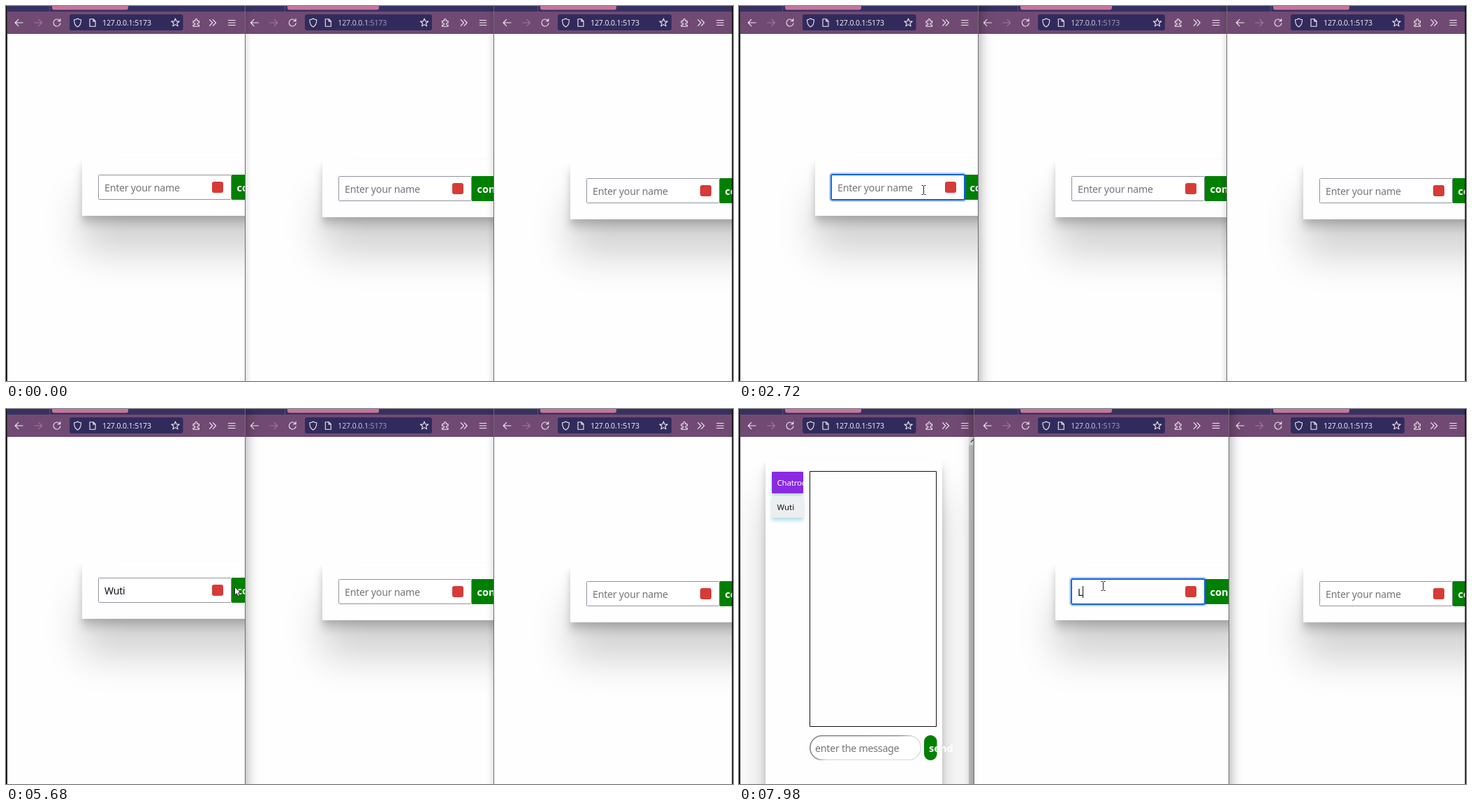
Animation of 1041x538 px, one loop 8 s. Source, as an HTML page with a canvas:

```html
<!DOCTYPE html>
<html lang="en">
<head>
<meta charset="utf-8">
<title>Chat in three windows</title>
<style>
html, body { margin: 0; width: 100%; height: 100%; overflow: hidden; background: #fefefe; }
canvas { display: block; }
</style>
</head>
<body>
<canvas id="stage" width="1041" height="538"></canvas>
<script>
const ctx = document.getElementById('stage').getContext('2d');
const W = 1041, H = 538, LOOP = 8000;
const SANS = '"Noto Sans", "Open Sans", sans-serif';
const PAGE = '#fefefe', GREEN = '#008000';
const USER = 'Wuti';

// Moments of the story, in ms
const ACTIVATE_LEFT = 2110, FOCUS_LEFT = 2180, BLUR_LEFT = 4870;
const JOIN = 5810, ACTIVATE_MID = 7180, FOCUS_MID = 7320;
const KEYS_LEFT = [2990, 3260, 3460, 3590], KEY_MID = 7980;

const WINDOWS = {
  left: { x: 1, right: 343, nav: 0, tools: 0, end: 0, bar: [91, 162.5], tab: [66, 109] },
  mid: { x: 336, right: 702, nav: 337.3, tools: 356.5, end: 359.7, bar: [428, 182], tab: [403, 131] },
  right: { x: 698, right: 1041, nav: 699, tools: 699, end: 699.3, bar: [790, 163], tab: [765, 109] }
};

const ICONS = {
  back: 'M5.5 0H-5.3M-.8-4.6L-5.4 0L-.8 4.6',
  forward: 'M-5.5 0H5.3M.8-4.6L5.4 0L.8 4.6',
  reload: 'M3.6-3.4A5 5 0 1 0 4.9 .8M4.7-5.6V-2.3H1.3',
  shield: 'M0-6C2-4.6 4-4.3 5-4.3C5 1 4 4 0 6C-4 4-5 1-5-4.3C-4-4.3-2-4.6 0-6Z',
  doc: 'M-4-5.3H1L4-2.3V5.3H-4ZM.8-5.3V-2.1H4',
  star: starPath(6, 2.6),
  puzzle: 'M-4.5-2.5H-1.7V-4A1.5 1.5 0 0 1 1.3-4V-2.5H4V.2H3A1.5 1.5 0 0 0 3 3.2H4V5.3H-4.5V3.2H-3.2A1.5 1.5 0 0 0-3.2 .2H-4.5Z',
  more: 'M-4.5-4.4L-.3 0L-4.5 4.4M.3-4.4L4.5 0L.3 4.4',
  menu: 'M-4.8-3.5H4.8M-4.8 0H4.8M-4.8 3.5H4.8'
};

function starPath(outer, inner) {
  let d = '';
  for (let i = 0; i < 10; i++) {
    const r = i % 2 ? inner : outer, a = i * Math.PI / 5;
    d += (i ? 'L' : 'M') + (r * Math.sin(a)).toFixed(2) + ' ' + (-r * Math.cos(a)).toFixed(2);
  }
  return d + 'Z';
}

function rect(x, y, w, h, fill) {
  ctx.fillStyle = fill;
  ctx.fillRect(x, y, w, h);
}

function box(x, y, w, h, r, fill, stroke, line = 1) {
  ctx.beginPath();
  ctx.roundRect(x, y, w, h, r);
  if (fill) { ctx.fillStyle = fill; ctx.fill(); }
  if (stroke) { ctx.strokeStyle = stroke; ctx.lineWidth = line; ctx.stroke(); }
}

function text(s, x, y, size, color, weight = 400, spacing = 0) {
  ctx.font = `${weight} ${size}px ${SANS}`;
  ctx.letterSpacing = spacing + 'px';
  ctx.fillStyle = color;
  ctx.fillText(s, x, y);
  return ctx.measureText(s).width;
}

function shadow(color, dx, dy, blur, draw) {
  ctx.save();
  ctx.shadowColor = color;
  ctx.shadowOffsetX = dx;
  ctx.shadowOffsetY = dy;
  ctx.shadowBlur = blur;
  draw();
  ctx.restore();
}

function icon(name, x, color = '#f3ecf4') {
  ctx.save();
  ctx.translate(x, 24);
  ctx.strokeStyle = color;
  ctx.lineWidth = 1.1;
  ctx.lineJoin = ctx.lineCap = 'round';
  ctx.stroke(new Path2D(ICONS[name]));
  ctx.restore();
}

function card(x, y, w, h) {
  const layers = [[.18, 52, 55], [.17, 12, 13], [.07, 5, 6]];
  for (const [alpha, dy, blur] of layers) {
    shadow(`rgba(0,0,0,${alpha})`, 0, dy, blur, () => rect(x, y, w, h, PAGE));
  }
  rect(x, y, w, h, PAGE);
}

function toolbar(win, dim) {
  const { nav, tools, end, bar, tab } = win;
  rect(0, 0, W, 8, '#373162');
  rect(tab[0] - 4, 0, 1, 8, '#574c80');
  box(tab[0], -8, tab[1], 13.5, 3, '#c6759c');
  rect(0, 8, W, 32, '#714a73');
  rect(0, 39, W, 1, '#68456b');
  box(bar[0], 12, bar[1], 23, 3, '#312b5d');
  icon('back', nav + 18.5);
  icon('forward', nav + 46, '#9b7a9d');
  icon('reload', nav + 73);
  icon('shield', nav + 102.5);
  icon('doc', nav + 124);
  const w = text('127.0.0.1', nav + 138, 28, 10.6, dim ? '#c9c6d8' : '#ebe9f2', 400, -.15);
  text(':5173', nav + 138 + w, 28, 10.6, dim ? '#9a96b4' : '#ebe9f2', 400, -.15);
  icon('star', tools + 242.5);
  icon('puzzle', tools + 272.5);
  icon('more', end + 296);
  icon('menu', end + 323.3);
}

function nameForm(dx, dy, { value = '', focus = 0, hover, caret } = {}) {
  ctx.save();
  ctx.translate(dx, dy);
  card(109, 219, 300, 82);
  box(323, 242, 76, 36, 1, GREEN);
  text('connect', 330.5, 266, 14.6, '#fff', 700);
  box(132.5, 242.5, 190, 35, 1, '#fff', hover ? '#666672' : '#9292a0');
  if (focus) {
    ctx.globalAlpha = focus;
    box(130, 240, 195, 40, 4, null, 'rgba(0,96,223,.3)', 2);
    box(132, 242, 191, 36, 2, null, '#1462d6', 1.8);
    ctx.globalAlpha = 1;
  }
  box(295, 252, 16, 16, 3, '#d63b37');
  let x = 141;
  if (value) x += text(value, x, 266, 14, '#111', 400, -.2);
  else text('Enter your name', x, 266, 14.2, '#757575', 400, -.25);
  if (caret) rect(Math.round(x), 252, 1, 17, '#111');
  ctx.restore();
}

function chatRoom() {
  card(38, 72, 253, 620);
  const member = (y, fill) => shadow('rgba(160,214,230,.8)', 0, 4, 5,
    () => box(47, y, 45, 31, 1, fill));
  member(90, '#8a2be2');
  member(125, '#eceeef');
  text('Chatroom', 54.5, 110, 11.4, '#fff', 400, -.15);
  text(USER, 54.5, 145, 11.4, '#111');
  box(101.5, 89.5, 181, 366, 0, PAGE, '#111');

  const edge = ctx.createLinearGradient(170, 468, 180, 504);
  edge.addColorStop(0, '#858585');
  edge.addColorStop(.45, '#929292');
  edge.addColorStop(.6, '#dedede');
  edge.addColorStop(1, '#e2e2e2');
  box(101.8, 468.8, 158.5, 34.5, 17, '#fff', edge, 1.6);
  text('enter the message', 109, 492, 14.2, '#757575', 400, -.25);
  box(265, 468, 18.5, 36, 9, GREEN);
  text('send', 272, 492, 14.6, '#fff', 700);

  rect(329, 39, 14, 14, '#f0f0f0');
  rect(329, 52, 14, 486, '#cdcdcd');
  ctx.beginPath();
  ctx.moveTo(332, 47.5);
  ctx.lineTo(335.3, 44);
  ctx.lineTo(338.6, 47.5);
  ctx.strokeStyle = '#555';
  ctx.lineWidth = 1.5;
  ctx.stroke();
}

function drawWindow(name, active, dim, content) {
  const win = WINDOWS[name], w = win.right - win.x;
  shadow(`rgba(0,0,0,${active ? .4 : .2})`, 0, 2, active ? 18 : 10,
    () => rect(win.x, -40, w, H + 80, '#6c6c70'));
  ctx.save();
  ctx.beginPath();
  ctx.rect(win.x + 1, 0, w - 2, H);
  ctx.clip();
  rect(win.x, 0, w, H, PAGE);
  content();
  toolbar(win, dim);
  ctx.restore();
}

// Pointer: [time, x, y], drawn in short steps inside each run of movement
const PATH = [
  [520, 986, 530], [900, 640, 455], [1280, 402, 411], [1350, 398, 404],
  [1560, 363, 354], [1900, 288, 280], [2110, 264, 264], [4260, 264, 264],
  [4270, 268, 269], [4610, 338, 266], [4870, 338, 265], [5340, 328, 256],
  [5610, 327, 255], [5940, 329, 257], [6200, 329, 257], [6270, 329, 257],
  [6600, 440, 262], [6960, 520, 254], [7030, 521, 254]
];
const RUNS = [520, 1350, 4270, 4870, 5610, 6200];
const STEP = 69.1;

function pointerAt(t) {
  if (t < PATH[0][0]) return null;
  const run = RUNS.filter(s => s <= t).pop();
  const q = run + Math.floor((t - run) / STEP + .02) * STEP;
  const i = PATH.findIndex(p => p[0] > q);
  if (i < 0) return PATH[PATH.length - 1].slice(1);
  const [t0, x0, y0] = PATH[i - 1], [t1, x1, y1] = PATH[i];
  const k = (q - t0) / (t1 - t0);
  return [x0 + (x1 - x0) * k, y0 + (y1 - y0) * k];
}

function inside(p, x, y) {
  return !!p && p[0] > x && p[0] < x + 190 && p[1] > y && p[1] < y + 36;
}

function drawPointer([x, y], beam) {
  ctx.save();
  ctx.translate(Math.round(x), Math.round(y));
  ctx.lineWidth = 1;
  if (beam) {
    ctx.strokeStyle = '#222';
    ctx.stroke(new Path2D('M-2.5-6.5H-.5L.5-5.5L1.5-6.5H3.5M.5-5.5V5.5M-2.5 6.5H-.5L.5 5.5L1.5 6.5H3.5'));
  } else {
    const arrow = new Path2D('M.5 0V12.2L3.3 9.6L5.2 14L7.3 13L5.4 8.8H9Z');
    ctx.fillStyle = '#fff';
    ctx.strokeStyle = '#1a1a1a';
    ctx.fill(arrow);
    ctx.stroke(arrow);
  }
  ctx.restore();
}

const within = (t, a, b) => t >= a && t < b;

function render(t) {
  const p = pointerAt(t);
  const onLeft = t < JOIN && inside(p, 132, 242);
  const onMid = inside(p, 476, 244);
  const focused = within(t, FOCUS_LEFT, BLUR_LEFT + 140);
  const fade = t < BLUR_LEFT
    ? Math.min(1, .4 + (t - FOCUS_LEFT) / 230)
    : Math.max(0, .6 - (t - BLUR_LEFT) / 230);
  const caretLeft = within(t, FOCUS_LEFT, 2720) || within(t, 2990, 3790) || within(t, 4340, 4800);
  const caretMid = within(t, FOCUS_MID, 7780) || t >= KEY_MID;

  const left = () => t < JOIN
    ? nameForm(0, 0, {
        value: USER.slice(0, KEYS_LEFT.filter(k => k <= t).length),
        focus: focused ? fade : 0, hover: onLeft, caret: caretLeft
      })
    : chatRoom();
  const mid = () => nameForm(344, 2, {
    value: t >= KEY_MID ? 'L' : '', focus: t >= FOCUS_MID ? 1 : 0, hover: onMid, caret: caretMid
  });
  const right = () => nameForm(699, 5);
  const pages = { left, mid, right };

  const active = t >= ACTIVATE_MID ? 'mid' : t >= ACTIVATE_LEFT ? 'left' : '';
  const order = active === 'mid' ? ['left', 'right', 'mid']
    : active ? ['mid', 'right', 'left'] : ['mid', 'left', 'right'];

  rect(0, 0, W, H, '#000');
  for (const name of order) drawWindow(name, name === active, name === 'mid', pages[name]);
  rect(0, 0, 1.5, H, '#0a0a0a');
  rect(1039.5, 0, 1.5, H, '#0a0a0a');
  if (p) drawPointer(p, onLeft || onMid);
}

const start = performance.now();
function tick() {
  render((performance.now() - start) % LOOP);
  requestAnimationFrame(tick);
}
tick();
</script>
</body>
</html>
```
